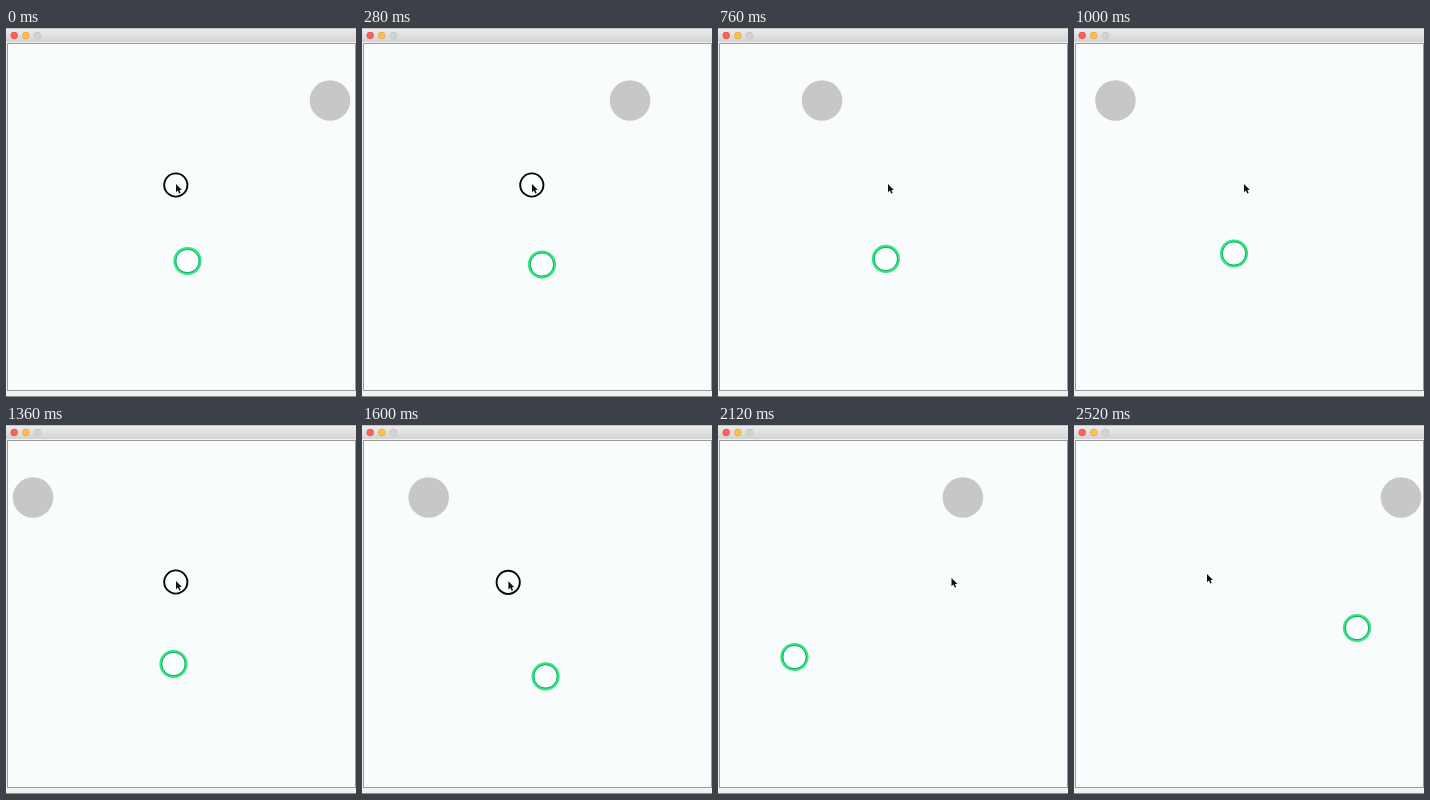
Write an HTML page that moves like this. It is 350 by 369 pixels and loops after 2.56 s.

```html
<!DOCTYPE html>
<html lang="en">
<head>
<meta charset="utf-8">
<title>Bouncing circles</title>
<style>
  html, body { margin: 0; width: 100%; height: 100%; overflow: hidden; background: #f8fcfd; }
  svg { display: block; }
</style>
</head>
<body>
<svg width="350" height="369" viewBox="0 0 350 369">
  <defs>
    <linearGradient id="bar" x1="0" y1="0" x2="0" y2="1">
      <stop offset="0" stop-color="#eeeeee"/>
      <stop offset="1" stop-color="#d3d3d3"/>
    </linearGradient>
  </defs>
  <rect width="350" height="369" fill="#f0f1f1"/>
  <rect width="350" height="14" fill="url(#bar)"/>
  <rect width="350" height="1" fill="#c4c4c4"/>
  <rect x="1.5" y="15.5" width="348" height="347" fill="#f8fcfd" stroke="#9a9c9c"/>
  <rect y="368" width="350" height="1" fill="#8e8e8e"/>
  <g stroke-width=".6">
    <circle cx="8.2" cy="7.5" r="3.4" fill="#fc625d" stroke="#df4945"/>
    <circle cx="19.8" cy="7.5" r="3.4" fill="#fdc04a" stroke="#dea034"/>
    <circle cx="31.4" cy="7.5" r="3.4" fill="#d2d2d2" stroke="#c0c0c0"/>
  </g>
  <circle id="ball" cy="72.5" r="20.3" fill="#c7c7c7"/>
  <g id="bob" fill="none">
    <circle r="12.7" fill="#fbfefe" stroke="#35e77d" stroke-width="2.8"/>
    <circle r="11.7" stroke="#17a873" stroke-width="1"/>
  </g>
  <g id="mouse">
    <circle id="ring" cx="-.2" cy="1" r="11.6" fill="#fbfefe" stroke="#080808" stroke-width="1.9"/>
    <path d="M0 0V8.2L1.9 6.5L3.3 9.6L4.7 9L3.4 6H5.9Z" fill="#111" stroke="#fff" stroke-opacity=".7" stroke-width=".8" paint-order="stroke"/>
  </g>
</svg>
<script>
const LOOP = 2560, STEP = 40;
const times = [0, 520, 1000, 1360, 1800, 2120, 2520];
const phase = [16, 85, 149.5, 197.3, 250, 296.8, 348.7];
const bobX = [181.5, 177, 160, 167.5, 181, 76.5, 283];
const bobY = [233, 237.5, 225.5, 239, 256.5, 232, 203];
const mouseT = [0, 1440, 1800, 2120, 2520];
const mouseX = [170, 170, 113.4, 233.5, 133];
const mouseY = [156, 156, 156.8, 153, 149];

const $ = id => document.getElementById(id);
const ball = $('ball'), bob = $('bob'), mouse = $('mouse'), ring = $('ring');

function segment(ts, t) {
  let i = 0;
  while (i < ts.length - 2 && t >= ts[i + 1]) i++;
  return [i, Math.min(1, (t - ts[i]) / (ts[i + 1] - ts[i]))];
}

// Cubic through all points, slopes taken from the neighbours
function curve(ts, vs, t) {
  const [i, u] = segment(ts, t), h = ts[i + 1] - ts[i];
  const slope = k => {
    const a = Math.max(0, k - 1), b = Math.min(ts.length - 1, k + 1);
    return (vs[b] - vs[a]) / (ts[b] - ts[a]) * h;
  };
  const d = vs[i + 1] - vs[i], m = slope(i), n = slope(i + 1);
  return vs[i] + u * (m + u * (3 * d - 2 * m - n + u * (m + n - 2 * d)));
}

// Stops briefly at every point
function ease(ts, vs, t) {
  const [i, u] = segment(ts, t);
  return vs[i] + (vs[i + 1] - vs[i]) * u * u * (3 - 2 * u);
}

const place = (el, x, y) => el.setAttribute('transform', `translate(${x.toFixed(2)} ${y.toFixed(2)})`);

function draw(now) {
  const t = Math.floor(now % LOOP / STEP) * STEP;
  const angle = curve(times, phase, t) * Math.PI / 180;
  ball.setAttribute('cx', 175 + 155 * Math.cos(angle));
  place(bob, curve(times, bobX, t), curve(times, bobY, t));
  place(mouse, ease(mouseT, mouseX, t), ease(mouseT, mouseY, t));
  const shown = t < 760 || (t >= 1180 && t < 1960);
  ring.setAttribute('visibility', shown ? 'visible' : 'hidden');
}

const start = performance.now();
function tick() {
  draw(performance.now() - start);
  requestAnimationFrame(tick);
}
tick();
</script>
</body>
</html>
```
